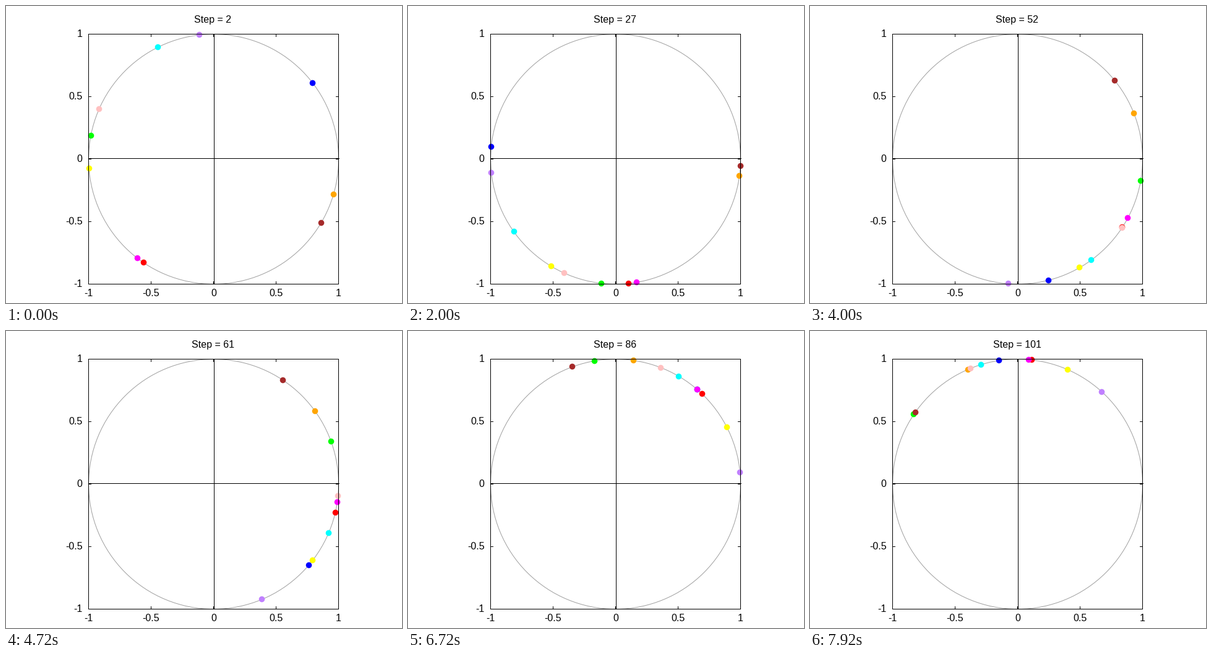
Animation of 640x480 px, one loop 8000 ms. Source, as a matplotlib script:

```python
import matplotlib.pyplot as plt
import numpy as np
from matplotlib.animation import FuncAnimation
from matplotlib.patches import Circle

FRAMES, INTERVAL, FIRST_STEP = 100, 80, 2
LEFT, RIGHT, TOP, BOTTOM = 133.5, 537.5, 45.5, 449.5
CX, CY, RADIUS = 335.5, 247.5, 202
COMMON_SPEED = 2.7  # degrees per step that all oscillators settle to

# Colour: start phase, total phase gained on the common speed, decay per step.
OSCILLATORS = {
    "#ff0000": (235.9, -68.9, 0.0204),
    "#00ff00": (169.3, 95.9, 0.0130),
    "#0000ff": (37.6, 180.1, 0.0194),
    "#ff00ff": (232.5, -79.3, 0.0119),
    "#00ffff": (116.4, 116.4, 0.0127),
    "#ffff00": (184.3, -27.7, 0.0245),
    "#ffa500": (-16.4, -168.2, 0.0172),
    "#a52a2a": (-30.6, -110.1, 0.0181),
    "#ffc0c0": (156.4, 56.6, 0.0196),
    "#c080ff": (96.5, 47.7, 0.0252),
}

plt.rcParams["font.family"] = "Liberation Sans"
fig = plt.figure(figsize=(8, 6), dpi=80, facecolor="white")
ax = fig.add_axes([0, 0, 1, 1])
ax.set(xlim=(0, 640), ylim=(480, 0))
ax.axis("off")


def line(x, y, zorder=2):
    ax.plot(x, y, color="black", lw=0.9, snap=False, zorder=zorder)


def label(x, y, text, align):
    return ax.text(x, y, text, fontsize=14.4, ha=align, va="baseline")


def position(frame, start, gain, decay):
    """Pixel position of an oscillator whose speed relaxes exponentially."""
    theta = np.radians(start + COMMON_SPEED * frame
                       + gain * (1 - np.exp(-decay * frame)))
    return (CX + round(RADIUS * np.cos(theta)),
            CY - round(RADIUS * np.sin(theta)))


ax.add_patch(Circle((CX, CY), RADIUS, fill=False, ec="#a0a0a0", lw=0.9, zorder=1))
line([LEFT, RIGHT + 1], [CY - 1, CY - 1])
line([CX + 1, CX + 1], [TOP, BOTTOM])
line([LEFT, RIGHT, RIGHT, LEFT, LEFT], [TOP, TOP, BOTTOM, BOTTOM, TOP], zorder=5)

for k, text in enumerate(["-1", "-0.5", "0", "0.5", "1"]):
    x, y = LEFT + 101 * k, BOTTOM - 101 * k
    label(x, 469, text, "center")
    label(123.5, y + 4.5, text, "right")
    if 0 < k < 4:
        line([x, x], [TOP, TOP + 4])
        line([x, x], [BOTTOM, BOTTOM - 4])
        line([LEFT, LEFT + 4], [y, y])
        line([RIGHT, RIGHT - 4], [y, y])

title = label(334.5, 27, "", "center")
dots = [ax.add_patch(Circle((CX, CY), 4.8, fc=color, lw=0, zorder=3 + 0.1 * i))
        for i, color in enumerate(OSCILLATORS)]


def update(frame):
    title.set_text(f"Step = {frame + FIRST_STEP}")
    for dot, motion in zip(dots, OSCILLATORS.values()):
        dot.center = position(frame, *motion)
    return [title, *dots]


anim = FuncAnimation(fig, update, frames=FRAMES, interval=INTERVAL, repeat=True)
plt.show()
```
